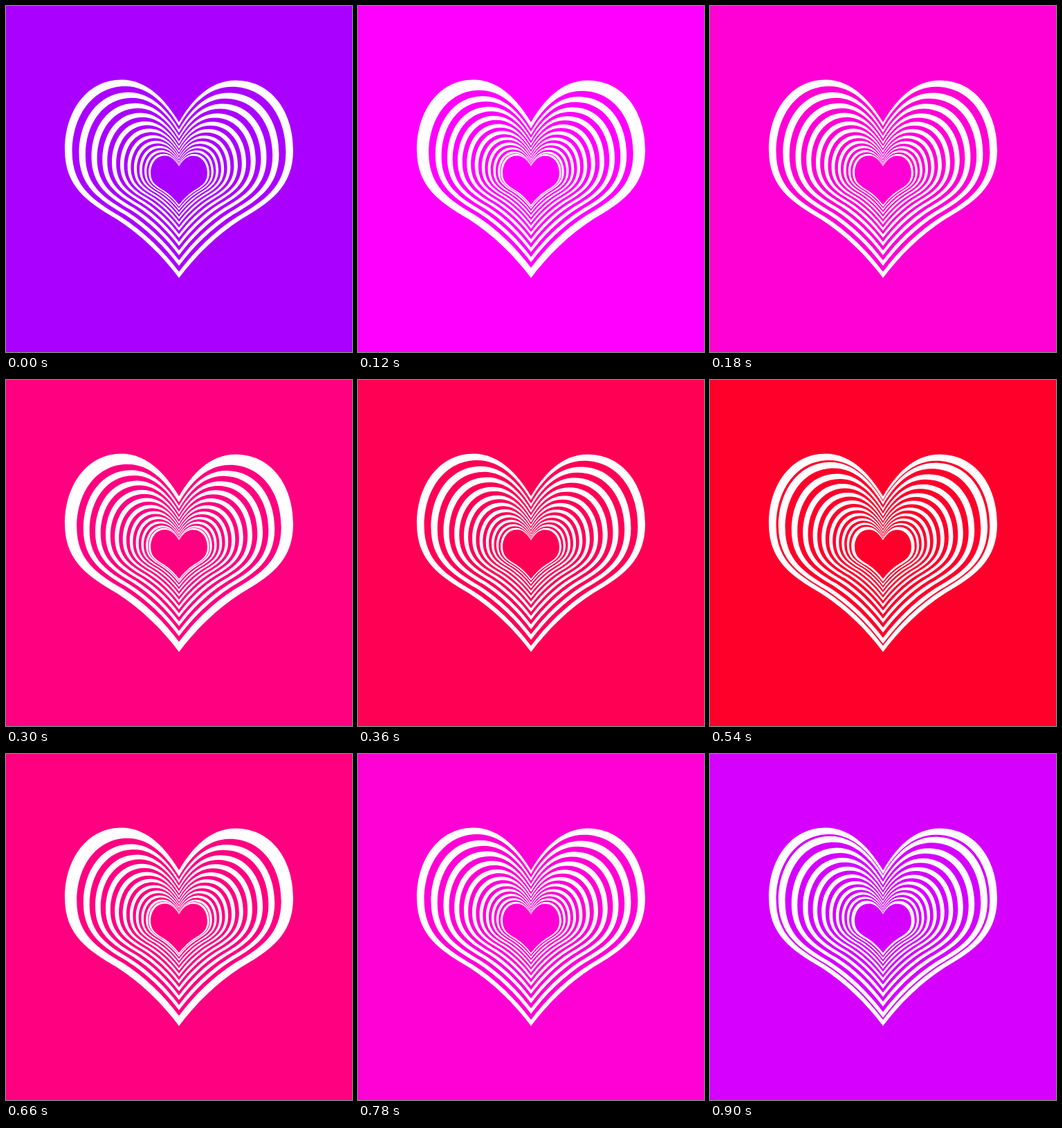
Animation, 500 px wide and 500 px high, one loop 0.96 s. Source, as an HTML page:

```html
<!DOCTYPE html>
<html lang="en">
<head>
<meta charset="utf-8">
<title>Heart tunnel</title>
<style>
  html, body { margin: 0; width: 100%; height: 100%; overflow: hidden; }
  svg { display: block; width: 100vw; height: 100vh; }
</style>
</head>
<body>
<svg id="stage" viewBox="0 0 500 500"></svg>
<script>
const NS = 'http://www.w3.org/2000/svg';
const stage = document.getElementById('stage');

const STEP = 60;      // ms per step
const STEPS = 16;     // steps per loop
const RINGS = 10;     // ring periods between rim and core
const Q = Math.pow(0.248, 1 / (RINGS + 0.5)); // size ratio of neighbouring rings

// Full-size heart; the origin is the point all rings shrink towards
const HEART = 'M0-84.5C-18-114.5-45-146-83-146C-133-146-165-100.5-165-44.5' +
  'C-165 9.5-131 31.5-90 55.5C-54 78.5-24 108.5 0 140.5C24 108.5 54 78.5 90 55.5' +
  'C131 31.5 165 9.5 165-44.5C165-100.5 133-145 82-145C44-145 18-115.5 0-84.5Z';

function add(tag, attrs, parent) {
  const el = document.createElementNS(NS, tag);
  for (const name in attrs) el.setAttribute(name, attrs[name]);
  parent.appendChild(el);
  return el;
}

const back = add('rect', { width: 500, height: 500 }, stage);
const hearts = add('g', { transform: 'translate(250 252.5)' }, stage);
const fills = [back];

// A ring is a white heart with a smaller heart in the background colour on it
function makeRing() {
  const outer = add('path', { d: HEART, fill: '#fff' }, hearts);
  const inner = add('path', { d: HEART }, hearts);
  fills.push(inner);
  return { outer, inner };
}

function setRing(ring, n) {
  ring.outer.setAttribute('transform', `scale(${Math.pow(Q, n)})`);
  ring.inner.setAttribute('transform', `scale(${Math.pow(Q, n + 0.5)})`);
}

const rim = makeRing();
const moving = Array.from({ length: RINGS }, makeRing);
const core = makeRing();
setRing(rim, 0);
setRing(core, RINGS);

function draw(ms) {
  const step = Math.floor(ms / STEP) % STEPS;
  const k = Math.min(step, STEPS - step);
  const shift = (k % 3) / 3;
  const colour = `hsl(${280 + 10 * k}, 100%, 50%)`;
  fills.forEach(el => el.setAttribute('fill', colour));
  moving.forEach((ring, i) => setRing(ring, i + 1 - shift));
}

const start = performance.now();
function tick() {
  draw(performance.now() - start);
  requestAnimationFrame(tick);
}
tick();
</script>
</body>
</html>
```
